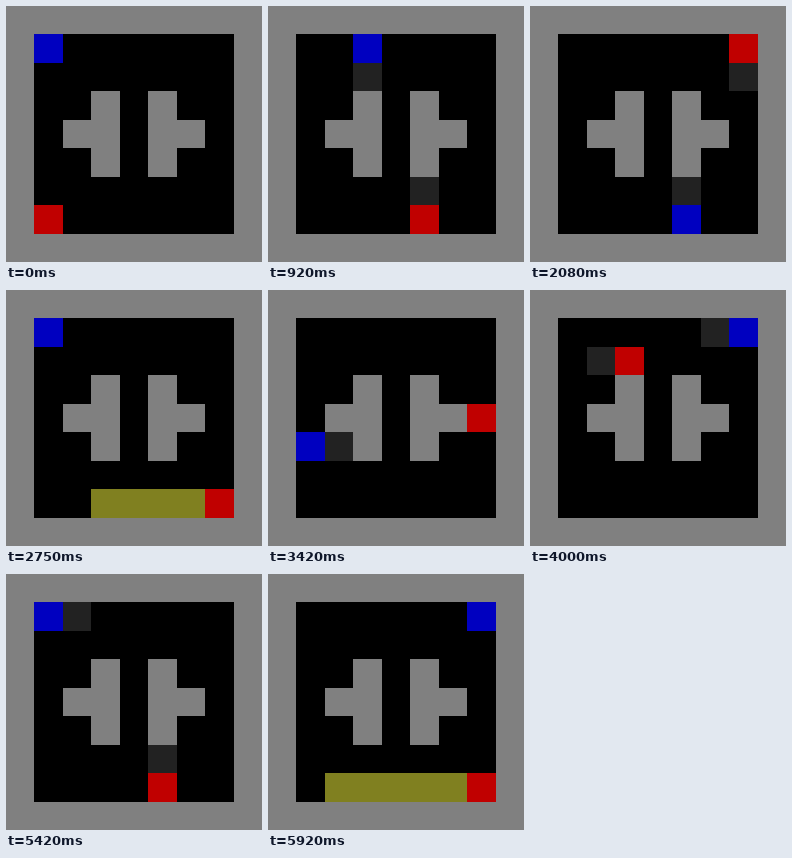
Recreate the animation shown at these times as an HTML page with a canvas. Size 256 by 256 pixels, loop 6010 ms.

```html
<!DOCTYPE html>
<html lang="en">
<head>
<meta charset="utf-8">
<title>Grid tag</title>
<style>
  html, body { margin: 0; width: 100%; height: 100%; overflow: hidden; background: #808080; }
  canvas { display: block; width: 256px; height: 256px; }
</style>
</head>
<body>
<canvas id="stage" width="256" height="256"></canvas>
<script>
const ctx = document.getElementById('stage').getContext('2d');
const LOOP = 6010, STEPS = 72, REACH = 5;
const WALL = '#808080', FLOOR = '#000', FRONT = '#222', BEAM = '#808020';

const MAP = [
  '#########',
  '#.......#',
  '#.......#',
  '#..#.#..#',
  '#.##.##.#',
  '#..#.#..#',
  '#.......#',
  '#.......#',
  '#########'
];
const DIRS = { u: [0, -1], d: [0, 1], l: [-1, 0], r: [1, 0] };
const CORNERS = [[1, 1, 'u'], [7, 1, 'u'], [1, 7, 'd'], [7, 7, 'd']];

// Lower case steps, upper case turns, x fires, a digit restarts in that corner.
const PLAYERS = [
  { color: '#0000c0', start: 0,
    moves: 'RxrrrrDdllu' + 'rddxddddllUrrr' + 'llulRd.0Rdddddxu' +
           'Uuuu.1Lxddduu.' + 'lllDu.0Rdu' + 'rrrrrr' },
  { color: '#c00000', start: 2,
    moves: 'Uurrrrrrdll' + 'lrl1Dddddxuuuu' + 'ddddddLxuuuuudd.' +
           'uulllxllldddRu' + 'ddrrrUxdr.' + 'rrLudx' }
];

const isWall = (x, y) => MAP[y][x] === '#';
const spawn = i => {
  const [x, y, dir] = CORNERS[i];
  return { x, y, dir };
};

function ray(from, others, reach) {
  const [dx, dy] = DIRS[from.dir], cells = [];
  for (let i = 1; i <= reach; i++) {
    const x = from.x + dx * i, y = from.y + dy * i;
    if (isWall(x, y) || others.some(o => o.x === x && o.y === y)) break;
    cells.push([x, y]);
  }
  return cells;
}

function act(agent, move, others) {
  if (move >= '0' && move <= '3') return spawn(+move);
  const next = { x: agent.x, y: agent.y, dir: agent.dir };
  if (move === 'x') next.beam = ray(agent, others, REACH);
  else if (DIRS[move]) {
    const [dx, dy] = DIRS[move];
    if (!isWall(next.x + dx, next.y + dy)) {
      next.x += dx;
      next.y += dy;
    }
  } else if (move !== '.') next.dir = move.toLowerCase();
  return next;
}

const history = [PLAYERS.map(p => spawn(p.start))];
for (let s = 0; s < STEPS - 1; s++) {
  const now = history[s];
  history.push(now.map((a, i) => act(a, PLAYERS[i].moves[s], now.filter(o => o !== a))));
}

const edge = n => Math.round(n * 256 / 9);
function cell(x, y, color) {
  ctx.fillStyle = color;
  ctx.fillRect(edge(x), edge(y), edge(x + 1) - edge(x), edge(y + 1) - edge(y));
}

function draw(agents) {
  MAP.forEach((row, y) => [...row].forEach((c, x) => cell(x, y, c === '#' ? WALL : FLOOR)));
  for (const a of agents)
    for (const [x, y] of ray(a, agents.filter(o => o !== a), 1)) cell(x, y, FRONT);
  for (const a of agents)
    for (const [x, y] of a.beam || []) cell(x, y, BEAM);
  agents.forEach((a, i) => cell(a.x, a.y, PLAYERS[i].color));
}

// Twelve steps a second, each starting on a whole hundredth.
const stepAt = t => Math.min(STEPS - 1, Math.floor((Math.floor(t / 10) + 0.49) * 0.12));

const t0 = performance.now();
function tick() {
  draw(history[stepAt((performance.now() - t0) % LOOP)]);
  requestAnimationFrame(tick);
}
tick();
</script>
</body>
</html>
```
